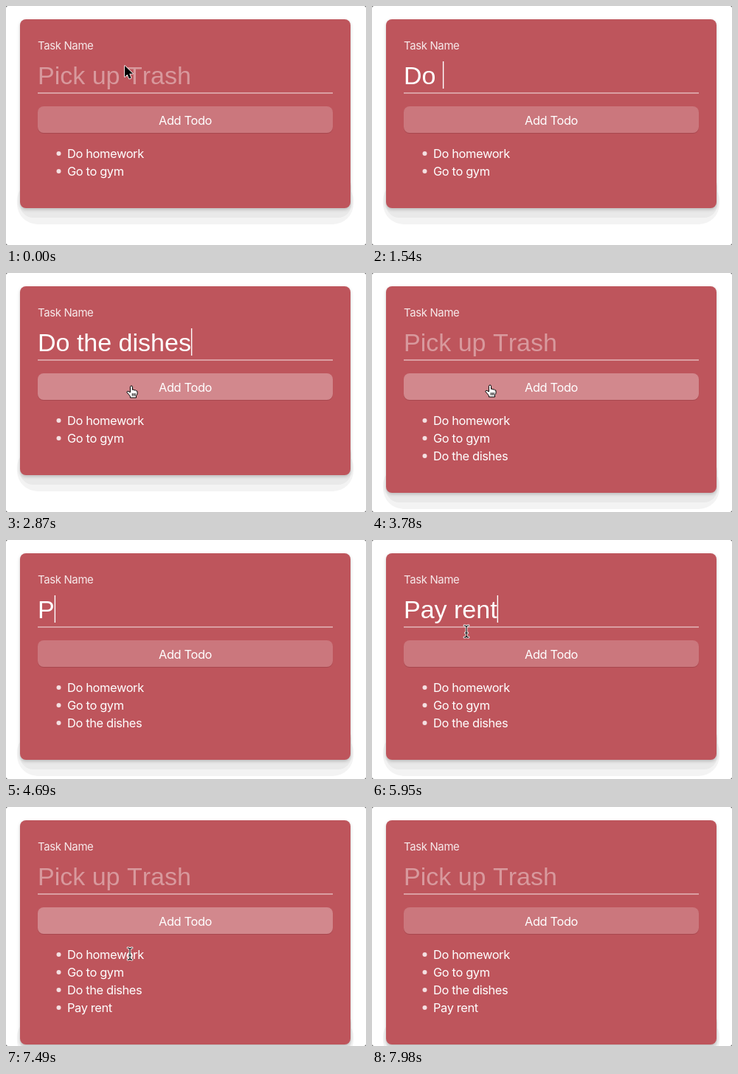
Animation of 488 by 324 pixels, one loop 8.82 s. Source, as an HTML page:

```html
<!DOCTYPE html>
<html lang="en">
<head>
<meta charset="utf-8">
<title>Todo list</title>
<style>
  html, body { margin: 0; width: 100%; height: 100%; overflow: hidden; background: #fff; }
  svg { display: block; width: 488px; height: 324px; }
  text { fill: #fff; font: 16.4px Inter, Roboto, sans-serif; letter-spacing: -.022em; }
  .label { font-size: 14.9px; fill: #f7e9ea; }
  .field { font: 34px "Liberation Sans", Arial, sans-serif; letter-spacing: 0; font-kerning: none; white-space: pre; }
  .hint { fill-opacity: .4; }
  #card { filter: drop-shadow(0 2px 2px rgba(0, 0, 0, .2)); }
  #list circle { fill: #f4dfe1; }
</style>
</head>
<body>
<svg viewBox="0 0 488 324">
  <rect id="far" x="15" y="236" width="456" height="60" rx="28" fill="#f3f3f3"/>
  <rect id="near" x="19" y="227" width="449" height="60" rx="18" fill="#e9e9e9"/>
  <rect id="card" x="19" y="18" width="448" height="256" rx="8" fill="#be555c"/>
  <text class="label" x="43" y="59">Task Name</text>
  <text id="hint" class="field hint" x="43" y="106">Pick up Trash</text>
  <text id="value" class="field" x="43" y="106"></text>
  <rect id="caret" y="75" width="1.4" height="37" fill="#fff"/>
  <rect x="43" y="117" width="400" height="2" fill="#fff" fill-opacity=".43"/>
  <rect x="43" y="137" width="400" height="36" rx="8" fill="#a8484f"/>
  <rect x="43" y="136" width="400" height="36" rx="8" fill="#be555c"/>
  <rect id="button" x="43" y="136" width="400" height="36" rx="8" fill="#fff"/>
  <text x="243" y="160.5" text-anchor="middle">Add Todo</text>
  <g id="list"></g>
  <circle id="ring" r="31.5" fill="none" stroke="#000" stroke-opacity=".45" stroke-width="2.5"/>
  <g id="pointer" stroke-linejoin="round" stroke-linecap="round">
    <path id="arrow" d="M0 0V15L3.5 11.8 6 17.5 8.6 16.4 6.2 10.8H11Z" fill="#000" stroke="#fff" stroke-width="1.6" paint-order="stroke"/>
    <path id="hand" d="M-1.6 8.5V1.4Q-1.5 0 0 0T1.5 1.4V5.4Q3 4.4 4 6 5.5 5.2 6.3 6.7 8 6.3 8 8V11L6.5 13.5V16H-1.6V14.2L-4 11.2-6.2 8.9Q-6.2 6.8-4.4 7.3ZM1.3 10.5V13.3M3.3 10.5V13.3M5.2 10.5V13.3" fill="#fff" stroke="#000" stroke-width="1"/>
    <g id="beam" fill="none">
      <path d="M-3-8Q0-8 0-6 0-8 3-8M0-6V6M-3 8Q0 8 0 6 0 8 3 8M-1.5 2H1.5" stroke="#fff" stroke-width="2.8"/>
      <path d="M-3-8Q0-8 0-6 0-8 3-8M0-6V6M-3 8Q0 8 0 6 0 8 3 8M-1.5 2H1.5" stroke="#000" stroke-width="1.1"/>
    </g>
  </g>
  <path d="M0 0H2L0 2ZM488 0H486L488 2ZM0 324H2L0 322ZM488 324H486L488 322Z" fill="#777"/>
</svg>
<script>
const LOOP = 8820, TICK = 70, BLINK = 490;
const $ = id => document.getElementById(id);
const show = (node, on) => node.setAttribute('visibility', on ? 'visible' : 'hidden');
const within = (t, from, to) => t >= from && t < to;

// Each session: focus, submit, text, and the time of every key press.
const sessions = [
  { focus: 140, submit: 3500, text: 'Do the dishes',
    keys: [840, 1400, 1540, 1680, 1750, 1820, 1960, 2030, 2100, 2240, 2310, 2450, 2520] },
  { focus: 4270, submit: 6580, text: 'Pay rent',
    keys: [4690, 4900, 5040, 5110, 5250, 5320, 5460, 5530] }
];
const clicks = [[70, 140, 153, 92], [3360, 3500, 165, 158.5], [4200, 4270, 104, 99], [6440, 6580, 165, 152]];
const moves = [
  [0, 'arrow', 161, 81], [70, 'beam', 153, 92], [770],
  [2800, 'beam', 159, 115], [2870, 'hand', 170, 153], [2940, 'hand', 170, 156],
  [3010, 'hand', 168, 158], [3150, 'hand', 165, 158],
  [3780, 'hand', 160, 152], [3850, 'beam', 143, 128], [3920, 'beam', 124, 111],
  [3990, 'beam', 109, 102], [4060, 'beam', 104, 99], [4620],
  [5950, 'beam', 128, 124], [6020, 'hand', 142, 137], [6090, 'hand', 153, 145],
  [6160, 'hand', 160, 149], [6230, 'hand', 164, 151], [6300, 'hand', 165, 152],
  [7490, 'beam', 168, 199], [7560, 'arrow', 189, 225],
  [7770, 'arrow', 198, 242], [7840, 'arrow', 219, 268], [7910, 'arrow', 248, 303], [7980]
];

const items = ['Do homework', 'Go to gym', ...sessions.map(s => s.text)];
$('list').innerHTML = items.map((item, i) =>
  `<g><circle cx="71.5" cy="${200 + 24 * i}" r="3"/><text x="83" y="${205.5 + 24 * i}">${item}</text></g>`).join('');

function hover(t) {
  if (within(t, 2870, 3850) || within(t, 6300, 7560)) return 1;
  return within(t, 6020, 6300) ? (t - 5950) / 350 : 0;
}

function drawField(t) {
  const session = sessions.find(s => within(t, s.focus, s.submit));
  const typed = session ? session.keys.filter(k => k <= t) : [];
  const last = typed.length ? typed[typed.length - 1] : session && session.focus;
  const value = $('value');
  value.textContent = session ? session.text.slice(0, typed.length) : '';
  show($('hint'), !typed.length);
  // The button takes the focus on press.
  const pressed = clicks.some(c => c[3] > 130 && within(t, c[0], c[1]));
  show($('caret'), session && !pressed && Math.floor((t - last) / BLINK) % 2 === 0 && t - last < BLINK);
  $('caret').setAttribute('x', 43 + (typed.length ? value.getComputedTextLength() : 0));
}

function drawCard(t) {
  const added = sessions.filter(s => t >= s.submit).length;
  const grow = 24 * added;
  $('card').setAttribute('height', 256 + grow);
  $('far').setAttribute('y', 236 + grow);
  $('near').setAttribute('y', 227 + grow);
  [...$('list').children].forEach((item, i) => show(item, i < 2 + added));
  $('button').setAttribute('fill-opacity', .2 + .1 * hover(t));
}

function drawPointer(t) {
  const [, kind, x = 0, y = 0] = moves.filter(m => m[0] <= t).pop();
  for (const id of ['arrow', 'hand', 'beam']) show($(id), id === kind);
  $('pointer').setAttribute('transform', `translate(${x} ${y})`);
  const click = clicks.find(c => within(t, c[0], c[1]));
  show($('ring'), click);
  if (click) $('ring').setAttribute('transform', `translate(${click[2]} ${click[3]})`);
}

const start = performance.now();
function frame() {
  const elapsed = (performance.now() - start) % LOOP;
  const t = Math.floor(elapsed / TICK) * TICK;
  drawField(t);
  drawCard(t);
  drawPointer(t);
  requestAnimationFrame(frame);
}
frame();
</script>
</body>
</html>
```
